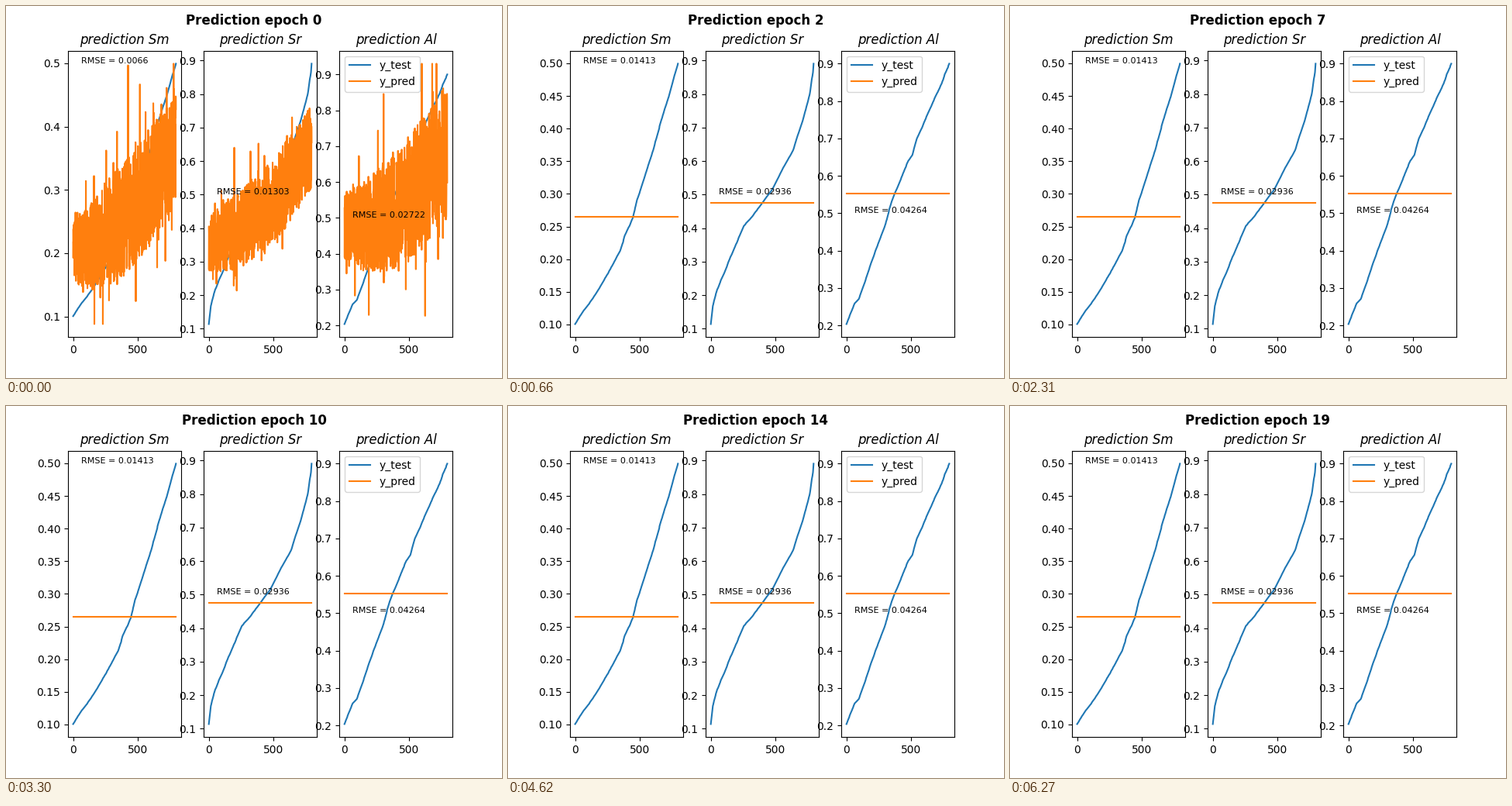
A matplotlib script for the animation above (6.6 s loop, 640x480 px).

```python
import numpy as np
import matplotlib.pyplot as plt
from matplotlib.animation import FuncAnimation

N = 800
FRAMES, INTERVAL = 20, 330
X = np.arange(N)
NAMES = ("Sm", "Sr", "Al")

# Bends of the sorted test curves: (sample, value)
BENDS = (
    ((0, .1005), (64, .1205), (160, .1465), (288, .19), (352, .2135), (384, .2355),
     (448, .263), (480, .29), (608, .368), (799, .4995)),
    ((0, .1136), (16, .168), (48, .215), (256, .406), (320, .4335), (480, .517),
     (560, .578), (640, .6325), (710, .715), (767, .7965), (794, .864), (799, .8907)),
    ((0, .2035), (64, .259), (96, .2705), (192, .3675), (288, .4555), (352, .532),
     (480, .64), (512, .6555), (544, .697), (799, .9)),
)

# Prediction bands: lower and upper edge at start, middle and end, then outliers
BANDS = (
    (((.15, .165, .28), (.25, .35, .45), ((165, .088),)),
     ((.27, .32, .52), (.44, .57, .77), ()),
     ((.38, .36, .50), (.57, .69, .88), ((682, .93),))),
    (((.13, .14, .165), (.23, .43, .42), ((165, .078),)),
     ((.26, .33, .54), (.43, .59, .75), ()),
     ((.28, .35, .60), (.47, .68, .88), ((6, .1727), (788, 1.098)))),
)
FLAT = (.2648, .4753, .5520)
RMSE = (
    ("0.0066", "0.01303", "0.02722"),
    ("0.01299", "0.01166", "0.01941"),
    ("0.01413", "0.02936", "0.04264"),
)


def test_curve(bends, rng):
    """Curve through the bends, with the uneven steps of sorted samples."""
    xs, ys = np.array(bends).T
    smooth = np.interp(X, xs, ys)
    steps = np.cumsum(rng.exponential(1, N))
    drift = (steps - np.interp(X, xs, steps[xs.astype(int)])) * 0.4
    return np.interp(X + drift, xs, ys) * 0.8 + smooth * 0.2


def edge(values):
    return np.polyval(np.polyfit((0, (N - 1) / 2, N - 1), values, 2), X)


def noisy(test, low, high, outliers, rng):
    """Uniform noise inside the band, with some spikes past its edges."""
    lo, hi = edge(low), edge(high)
    u = rng.random(N)
    spike = (rng.random(N) < 0.12) * rng.exponential(0.16, N)
    u = np.where(u > 0.5, u + spike, u - spike)
    y = lo + (hi - lo) * u
    limits = [test.min(), test.max()] + [v for _, v in outliers]
    y = np.clip(y, min(limits), max(limits))
    for i, value in outliers:
        y[i] = value
    return y


rng = np.random.default_rng(4)
tests = [test_curve(bends, rng) for bends in BENDS]
preds = [[noisy(test, *band, rng) for test, band in zip(tests, bands)] for bands in BANDS]
preds.append([np.full(N, level) for level in FLAT])

fig, axes = plt.subplots(1, 3, figsize=(6.4, 4.8), dpi=100)
heading = fig.suptitle("", fontsize=12, fontweight="bold")


def draw(epoch):
    stage = min(epoch, 2)
    heading.set_text(f"Prediction epoch {epoch}")
    for i, ax in enumerate(axes):
        ax.clear()
        ax.plot(X, tests[i], label="y_test")
        ax.plot(X, preds[stage][i], label="y_pred")
        ax.set_title(f"prediction {NAMES[i]}", fontstyle="italic")
        ax.text(60, 0.5, f"RMSE = {RMSE[stage][i]}", fontsize=8)
    axes[2].legend(loc="upper left")
    return []


anim = FuncAnimation(fig, draw, frames=FRAMES, init_func=lambda: draw(0),
                     interval=INTERVAL, repeat=True, repeat_delay=0)
plt.show()
```
